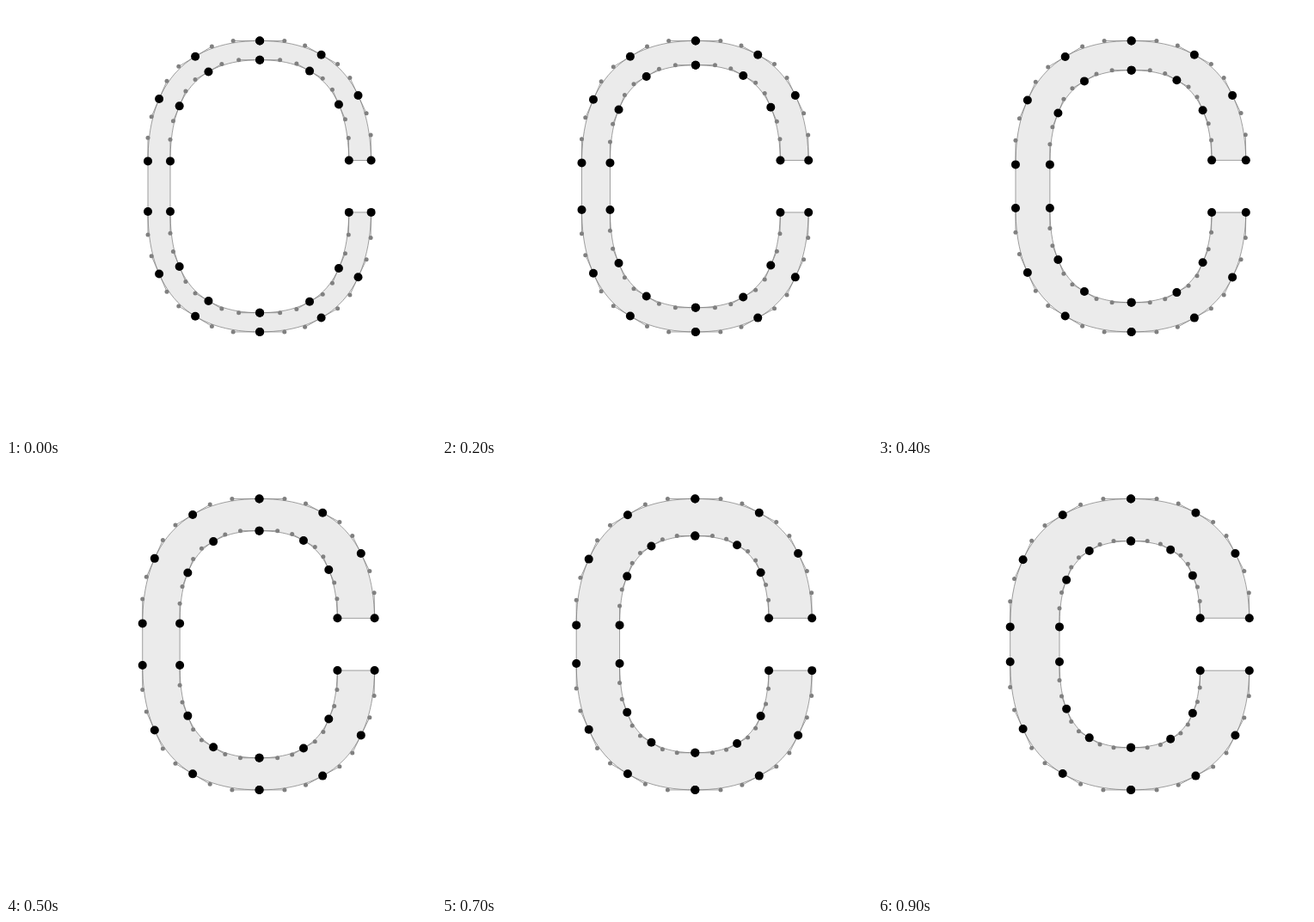
Animation of 500x500 px, one loop 1 s. Source, as an HTML page with a canvas:

```html
<!DOCTYPE html>
<html lang="en">
<head>
<meta charset="utf-8">
<title>Letter weight</title>
<style>
html, body { margin: 0; width: 100%; height: 100%; overflow: hidden; background: #fff; }
canvas { display: block; width: 500px; height: 500px; }
</style>
</head>
<body>
<canvas id="stage"></canvas>
<script>
const canvas = document.getElementById('stage');
const dpr = window.devicePixelRatio || 1;
canvas.width = canvas.height = 500 * dpr;
const ctx = canvas.getContext('2d');
ctx.scale(dpr, dpr);

const STEPS = 10, STEP_MS = 100;
const GRAY = '#808080';
const MID_Y = 209.7;

// Upper and lower quarter of one side, mirrored about MID_Y.
// rise: half height, gap: half length of the straight part,
// h and v: handle lengths relative to the quarter, inset: lean of the end handle.
function quarters(cx, x, rise, gap, h, v, inset = 0) {
  return [-1, 1].map(s => {
    const y = MID_Y + s * rise;
    return [
      [cx, y],
      [cx + h * (x - cx), y],
      [x - inset, MID_Y + s * (gap + v * (rise - gap))],
      [x, MID_Y + s * gap]
    ];
  });
}

// The letter C at a weight from 0 (light) to 1 (bold).
function letter(weight) {
  const mix = (light, bold) => light + (bold - light) * weight;
  const cx = mix(295.1, 294.1);
  const outer = 169.25, inner = mix(147, 120.1);
  const stem = mix(29.3, 20.3), mouth = mix(30.2, 30.5);
  return {
    outLeft: quarters(cx, mix(165, 153.7), outer, stem, mix(0.714, 0.688), mix(0.581, 0.596)),
    outRight: quarters(cx, mix(424.6, 431.8), outer, mouth, mix(0.665, 0.653), 0.637, 1.5),
    inLeft: quarters(cx, mix(191, 211), inner, stem, mix(0.706, 0.726), mix(0.641, 0.65)),
    inRight: quarters(cx, mix(398.8, 374.7), inner, mouth, mix(0.681, 0.712), mix(0.67, 0.661), 1.5)
  };
}

const blend = (a, b, t) => a.map((v, k) => v + (b[k] - v) * t);

// Point on a curve with its tangent ends, by de Casteljau.
function pointAt([a, b, c, d], t) {
  const bc = blend(b, c, t);
  const from = blend(blend(a, b, t), bc, t);
  const to = blend(bc, blend(c, d, t), t);
  return { p: blend(from, to, t), from, to };
}

function dot([x, y], r, color) {
  ctx.fillStyle = color;
  ctx.beginPath();
  ctx.arc(x, y, r, 0, Math.PI * 2);
  ctx.fill();
}

function outline({ outLeft, outRight, inLeft, inRight }) {
  const back = curve => [...curve].reverse();
  const loop = [
    outLeft[0], back(outLeft[1]), outRight[1], back(inRight[1]),
    inLeft[1], back(inLeft[0]), inRight[0], back(outRight[0])
  ];
  ctx.beginPath();
  ctx.moveTo(...loop[0][0]);
  for (const [a, b, c, d] of loop) {
    ctx.lineTo(...a);
    ctx.bezierCurveTo(...b, ...c, ...d);
  }
  ctx.closePath();
  ctx.fillStyle = '#ebebeb';
  ctx.fill();
  ctx.stroke();
}

// Each quarter shows as three equal spans with their own handles.
function controls(curves) {
  const nodes = [], handles = [];
  for (const curve of curves) {
    for (let i = 0; i <= 3; i++) {
      const { p, from, to } = pointAt(curve, i / 3);
      const tangent = [(to[0] - from[0]) / 3, (to[1] - from[1]) / 3];
      nodes.push(p);
      if (i > 0) handles.push([p, [p[0] - tangent[0], p[1] - tangent[1]]]);
      if (i < 3) handles.push([p, [p[0] + tangent[0], p[1] + tangent[1]]]);
    }
  }
  ctx.beginPath();
  for (const [p, h] of handles) {
    ctx.moveTo(...p);
    ctx.lineTo(...h);
  }
  ctx.stroke();
  for (const [, h] of handles) dot(h, 2.5, GRAY);
  for (const p of nodes) dot(p, 5, '#000');
}

function draw(weight) {
  ctx.fillStyle = '#fff';
  ctx.fillRect(0, 0, 500, 500);
  ctx.strokeStyle = GRAY;
  ctx.lineWidth = 0.75;
  const shape = letter(weight);
  outline(shape);
  controls(Object.values(shape).flat());
}

function frame(now) {
  const step = Math.floor(now / STEP_MS) % STEPS;
  draw(step / (STEPS - 1));
  requestAnimationFrame(frame);
}
draw(0);
requestAnimationFrame(frame);
</script>
</body>
</html>
```
